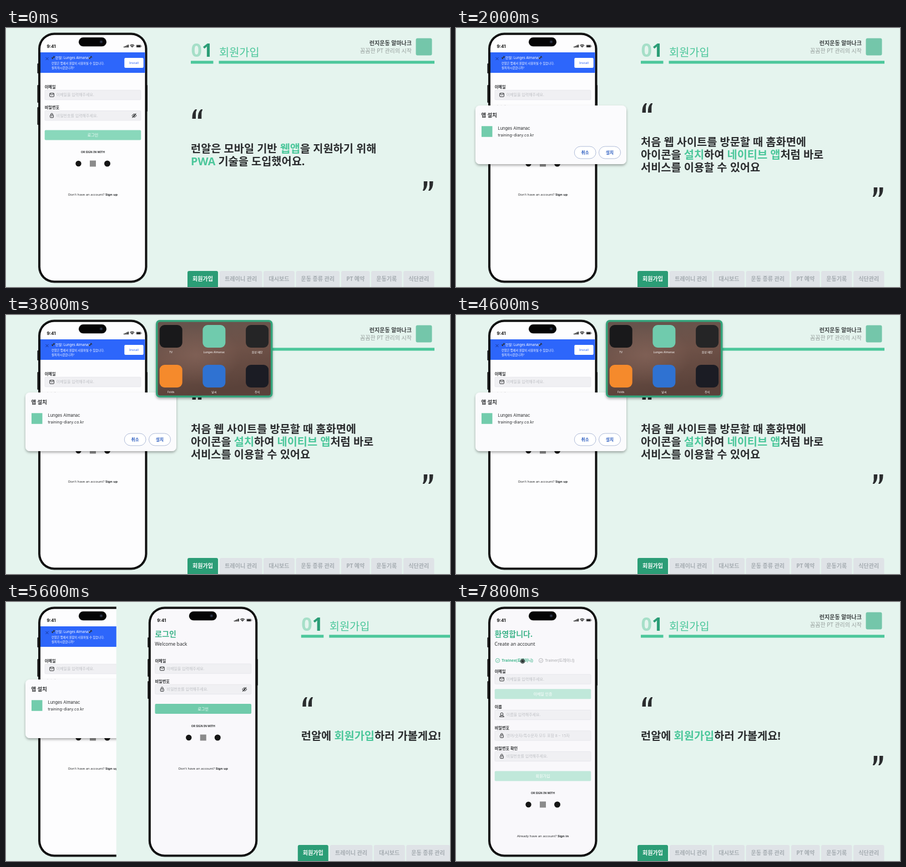
An HTML page for the animation above (8000 ms loop, 800 px wide and 468 px high).

```html
<!DOCTYPE html>
<html lang="ko">
<head>
<meta charset="utf-8">
<style>
  html, body { margin: 0; width: 100%; height: 100%; overflow: hidden; background: #e5f4ee; }
  svg { display: block; width: 100vw; height: 100vh; }
  text { font-family: "Noto Sans", "Noto Sans CJK KR", "Noto Sans CJK", sans-serif; }
  .inter { font-family: Inter, "Noto Sans", sans-serif; }
</style>
</head>
<body>
<svg id="stage" viewBox="0 0 800 468"></svg>
<script>
const GREEN = '#2b9d76', MINT = '#4cc79b', INK = '#2a2c2e';

// ---- drawing helpers ----
const rect = (x, y, w, h, fill, r = 0, extra = '') =>
  `<rect x="${x}" y="${y}" width="${w}" height="${h}" rx="${r}" fill="${fill}" ${extra}/>`;
const circle = (x, y, r, fill, extra = '') =>
  `<circle cx="${x}" cy="${y}" r="${r}" fill="${fill}" ${extra}/>`;
const line = (d, color = INK, width = 1, extra = '') =>
  `<path d="${d}" fill="none" stroke="${color}" stroke-width="${width}" ${extra}/>`;
const text = (x, y, size, str, { fill = INK, bold = false, anchor = 'start', cls = '' } = {}) =>
  `<text x="${x}" y="${y}" font-size="${size}" fill="${fill}" font-weight="${bold ? 700 : 400}" text-anchor="${anchor}" class="${cls}">${str}</text>`;
const group = (id, content, extra = '') => `<g id="${id}" ${extra}>${content}</g>`;
const accent = str => `<tspan fill="${MINT}">${str}</tspan>`;
const strong = str => `<tspan font-weight="700">${str}</tspan>`;

// ---- phone ----
function phoneFrame(screen) {
  const buttons = [[56.5, 64, 18], [56.5, 103, 32], [56.5, 143, 32], [252.5, 103, 48]]
    .map(([x, y, h]) => rect(x, y, 2.5, h, '#111', 1)).join('');
  return buttons +
    rect(58, 8.5, 196.5, 452, '#050505', 29) +
    rect(59.2, 9.7, 194.1, 449.6, 'none', 28, 'stroke="#555" stroke-width=".5"') +
    rect(62, 12.5, 188.5, 444, screen, 25);
}

function statusBar() {
  const bars = [0, 1, 2, 3].map(i => rect(212 + i * 2.4, 33.6 - i * 1.2, 1.7, 1.6 + i * 1.2, '#111', .4)).join('');
  return rect(131, 17, 50, 16.3, '#050505', 8.2) + circle(171.5, 25, 3, '#191d27') +
    circle(171.5, 25, 1.3, '#39435c') +
    text(73.5, 35.5, 7.8, '9:41', { bold: true, fill: '#111', cls: 'inter' }) + bars +
    line('M223.5 31.8Q227.3 28.6 231.1 31.8M225 33.4Q227.3 31.6 229.6 33.4', '#111', 1.3) + circle(227.3, 34.6, .8, '#111') +
    rect(234.4, 30.4, 9, 4.8, 'none', 1.4, 'stroke="#777" stroke-width=".6"') +
    rect(235.2, 31.2, 7.4, 3.2, '#111', .8) + rect(244, 31.9, .7, 1.8, '#777');
}

const icons = {
  mail: y => rect(78.8, y - 3.2, 7.6, 6.4, 'none', .8, `stroke="${INK}"`) + line(`M79 ${y - 2.6}l3.6 2.7l3.6 -2.7`),
  lock: y => rect(79.6, y - 1, 5.8, 4.6, 'none', .7, `stroke="${INK}"`) +
    line(`M80.8 ${y - 1}v-1.4a1.7 1.7 0 0 1 3.4 0v1.4M82.5 ${y + .6}v1.4`),
  user: y => circle(82.5, y - 1.4, 2.4, 'none', `stroke="${INK}"`) + line(`M78.5 ${y + 3.5}q.3 -2.7 4 -2.7t4 2.7z`),
};
const eyeOff = y => line(`M227 ${y}q4 -6 8 0q-4 6 -8 0z`) + circle(231, y, 1.5, INK) + line(`M227.4 ${y + 3.8}l7 -7.6`, INK, 1.1);

const field = (y, icon, hint, label) =>
  text(69.7, y - 3, 7.2, label, { bold: true }) +
  rect(70, y + .3, 173, 17.4, '#f0f0f3', 1.5, 'stroke="#e3e3e8" stroke-width=".7"') +
  icons[icon](y + 9) + text(90.7, y + 11.4, 7, hint, { fill: '#bfc0c5' });
const button = (y, label, fill) =>
  rect(69.7, y, 173.6, 18, fill, 2) + text(156.5, y + 11.5, 7, label, { fill: '#fff', anchor: 'middle' });
const social = (y, question, link, linkY) =>
  text(156.5, y - 19, 5, 'OR SIGN IN WITH', { bold: true, anchor: 'middle' }) +
  circle(130.5, y, 5.2, '#151515') + rect(151, y - 5.5, 11, 11, '#8b8b8b') + circle(182.5, y, 5.5, '#151515') +
  text(156.5, linkY, 6, `${question} ${strong(link)}`, { anchor: 'middle' });
const heading = (title, subtitle) =>
  text(69.5, 63, 14, title, { bold: true, fill: '#3fb48b' }) + text(69.5, 79, 8.6, subtitle);

const loginForm = (top, fill) =>
  field(top, 'mail', '이메일을 입력해주세요.', '이메일') +
  field(top + 37.3, 'lock', '비밀번호를 입력해주세요.', '비밀번호') + eyeOff(top + 46.3) +
  button(top + 72.5, '로그인', fill) +
  social(245, 'Don\'t have an account?', 'Sign up', 303);

function installBanner() {
  const dumbbell = x => line(`M${x} 55.2l4 -3.4`, '#222', 1.2) + line(`M${x - .6} 53.4l2 2.6M${x + 2.8} 50.8l2 2.6`, '#333', 1.5);
  const white = { fill: '#fff' };
  return rect(62, 44, 188.5, 37, '#2d66fb') + line('M71.5 53l5 5m0 -5l-5 5', '#15308a', .9) +
    dumbbell(83) + text(89, 56, 6.2, '런알: Lunges Almanac', white) + dumbbell(150) +
    text(82, 66, 5.25, '런알은 앱에서 원활히 사용하실 수 있습니다.', white) +
    text(82, 74, 5.25, '설치하시겠습니까?', white) +
    rect(213.3, 54, 34.4, 18, '#fff', 2) +
    text(230.5, 65, 6, 'Install', { fill: '#2d66fb', anchor: 'middle' });
}

function signUpForm() {
  const option = (x, label, color, bold) => circle(x, 105.7, 3.7, 'none', `stroke="${color}" stroke-width=".8"`) +
    line(`M${x - 1.7} 105.7l1.3 1.4l2.3 -2.6`, color, .8) + text(x + 7.3, 108.2, 7, label, { fill: color, bold });
  return heading('환영합니다.', 'Create an account') +
    option(75, 'Trainee(트레이니)', '#45b78f', true) + option(153, 'Trainer(트레이너)', '#a5a6aa') +
    field(130.5, 'mail', '이메일을 입력해주세요.', '이메일') + button(157.3, '이메일 인증', '#c0e8da') +
    field(195, 'user', '이름을 입력해주세요.', '이름') +
    field(232.5, 'lock', '영어/숫자/특수문자 모두 포함 8 ~ 15자', '비밀번호') +
    field(270, 'lock', '비밀번호를 입력해주세요.', '비밀번호 확인') + button(305.6, '회원가입', '#c0e8da') +
    social(366, 'Already have an account?', 'Sign in', 424.5);
}

// ---- slide ----
function slideChrome() {
  const tabs = [['회원가입', 327, 55], ['트레이니 관리', 385, 76.5], ['대시보드', 464, 56], ['운동 종류 관리', 522.5, 78.5],
    ['PT 예약', 604, 51.5], ['운동기록', 658, 55.5], ['식단관리', 716, 55.5]];
  return rect(0, 0, 800, 468, '#e5f4ee') +
    text(333.5, 52, 34, `<tspan fill="#a6dfc8">0</tspan><tspan fill="${GREEN}">1</tspan>`, { bold: true }) +
    text(384, 51, 19.74, '회원가입', { fill: MINT }) +
    rect(333, 59.3, 40.5, 5.2, MINT) + rect(383.5, 59.3, 388.5, 5.2, MINT) +
    text(731, 31, 10, '런지운동 알마나크', { anchor: 'end', bold: true, fill: '#3c4142' }) +
    text(731, 45, 10, '꼼꼼한 PT 관리의 시작', { anchor: 'end', fill: '#969e9c' }) +
    rect(738.5, 18.5, 29, 31, '#74c6aa', 3) +
    tabs.map(([label, x, w], i) => rect(x, 439, w, 40, i ? '#dfe3e7' : GREEN, 3) +
      text(x + w / 2, 457.3, 10, label, { fill: i ? '#a4abb0' : '#fff', bold: true, anchor: 'middle' })).join('');
}

function quote(openY, closeY, firstLine, lines) {
  const mark = x => `M${x + .5} 17Q${x} 5 ${x + 6} 0H${x + 9}Q${x + 6.3} 5 ${x + 7} 10V17Z`;
  const marks = `<path d="${mark(0)}${mark(10.3)}" fill="${INK}"/>`;
  return `<g transform="translate(335 ${openY})">${marks}</g>` +
    `<g transform="translate(770 ${closeY + 17}) rotate(180)">${marks}</g>` +
    lines.map((str, i) => text(333, firstLine + i * 23.2, 19.74, str, { bold: true })).join('');
}

function installDialog() {
  const blue = '#2c5dc0';
  const pill = (x, w, label) => rect(x, 214, w, 22, '#fff', 11, 'stroke="#a8b5d4" stroke-width=".9"') +
    text(x + w / 2, 227.8, 7.5, label, { fill: blue, bold: true, anchor: 'middle' });
  return rect(35, 140, 272, 106, '#fbfbfd', 8, 'filter="url(#shadow)"') +
    text(45.5, 161, 9.4, '앱 설치', { bold: true }) + rect(46, 177.3, 19.5, 19.5, '#72ccac') +
    text(75.5, 184.3, 7.4, 'Lunges Almanac', { cls: 'inter' }) +
    text(75.5, 195.5, 7.2, 'training-diary.co.kr', { cls: 'inter' }) +
    pill(213.3, 38.7, '취소') + pill(257.5, 39, '설치');
}

function homeScreen() {
  const apps = [['TV', '#19191b'], ['Lunges Almanac', '#70cbad'], ['음성 메모', '#252526'],
    ['Folds', '#f58a2c'], ['날씨', '#2f72d2'], ['주식', '#1b1c24']];
  return rect(270, 9, 210.5, 140, '#35a47b', 7, 'filter="url(#shadow)"') +
    rect(273.5, 12.5, 203.5, 133, 'url(#wallpaper)', 4) + rect(273.5, 12.5, 203.5, 133, 'url(#glow)', 4) +
    apps.map(([label, fill], i) => {
      const x = 276.7 + i % 3 * 77.7, y = i < 3 ? 18 : 90;
      return rect(x, y, 41, 41, fill, 9) +
        text(x + 20.5, y + 51, 5, label, { fill: '#fff', anchor: 'middle' });
    }).join('');
}

const defs = `<defs>
  <filter id="shadow" x="-10%" y="-10%" width="120%" height="130%">
    <feDropShadow dx="0" dy="2.5" stdDeviation="2" flood-color="#000" flood-opacity=".32"/></filter>
  <linearGradient id="wallpaper" x1="0" y1="0" x2=".25" y2="1">
    <stop offset="0" stop-color="#65544d"/><stop offset=".5" stop-color="#6f5248"/><stop offset="1" stop-color="#5a423a"/></linearGradient>
  <radialGradient id="glow" cx=".34" cy=".45" r=".4">
    <stop offset="0" stop-color="#85655a" stop-opacity=".7"/><stop offset="1" stop-color="#85655a" stop-opacity="0"/></radialGradient>
</defs>`;

const installPage = slideChrome() + phoneFrame('#fdfdfe') + statusBar() + installBanner() + loginForm(112, '#89d8bb') +
  group('introQuote', quote(147, 277, 224.7, [`런알은 모바일 기반 ${accent('웹앱')}을 지원하기 위해`, `${accent('PWA')} 기술을 도입했어요.`])) +
  group('dialog', quote(136, 288, 213, ['처음 웹 사이트를 방문할 때 홈화면에',
    `아이콘을 ${accent('설치')}하여 ${accent('네이티브 앱')}처럼 바로`, '서비스를 이용할 수 있어요']) + installDialog()) +
  group('home', homeScreen());

const pointer = group('arrows', line('M-3 0h6M0 -3v6', '#fff', 2.6) + line('M-2.7 0h5.4M0 -2.7v5.4', '#111', 1.2) +
    '<path d="M0 -3.8l1.7 1.8h-3.4zM0 3.8l1.7 -1.8h-3.4zM-3.8 0l1.8 1.7v-3.4zM3.8 0l-1.8 1.7v-3.4z" fill="#111"/>') +
  group('press', circle(0, 0, 4.4, '#3d4545', 'opacity=".85"') + line('M-2 0h4M0 -2v4', '#111', .9));

const signUpPage = slideChrome() + phoneFrame('#f9f8fb') + statusBar() +
  group('login', heading('로그인', 'Welcome back') + loginForm(111.5, '#70cbab')) + group('signUp', signUpForm()) +
  quote(172, 278, 248.7, [`런알에 ${accent('회원가입')}하러 가볼게요!`]) + group('pointer', pointer);

document.getElementById('stage').innerHTML = defs + group('first', installPage) + group('second', signUpPage);

// ---- motion ----
const $ = id => document.getElementById(id);
const show = (id, on) => $(id).setAttribute('display', on ? 'inline' : 'none');
const move = (id, x, y) => $(id).setAttribute('transform', `translate(${x} ${y})`);
const progress = (t, start, length) => Math.min(1, Math.max(0, (t - start) / length));
const easeInOut = p => p < .5 ? 4 * p ** 3 : 1 - 4 * (1 - p) ** 3;
const mix = (a, b, p) => a + (b - a) * p;

const LOOP = 8000, STEP = 200;
const pointerPath = [[6200, 222, 340], [6600, 207, 306], [6800, 196, 302], [7000, 196, 302], [7600, 120, 107]];

function pointerAt(t) {
  let [, x, y] = pointerPath[0];
  for (let i = 1; i < pointerPath.length; i++) {
    const [start] = pointerPath[i - 1], [end, toX, toY] = pointerPath[i];
    const p = easeInOut(progress(t, start, end - start));
    x = mix(x, toX, p);
    y = mix(y, toY, p);
  }
  return [x, y];
}

function render(t) {
  const installing = t >= 600, registering = t >= 7000;
  const pressed = t === 6800 || t >= 7600;
  show('introQuote', !installing);
  show('dialog', installing);
  show('home', t >= 3800);
  show('second', t >= 5000);
  move('second', 800 * (1 - easeInOut(progress(t, 4990, 1010))), 0);
  show('login', !registering);
  show('signUp', registering);
  show('pointer', t >= 6200);
  show('press', pressed);
  show('arrows', !pressed);
  move('pointer', ...pointerAt(t));
}

function tick() {
  const t = performance.now() % LOOP;
  render(Math.floor(t / STEP) * STEP);
  requestAnimationFrame(tick);
}
tick();
</script>
</body>
</html>
```
